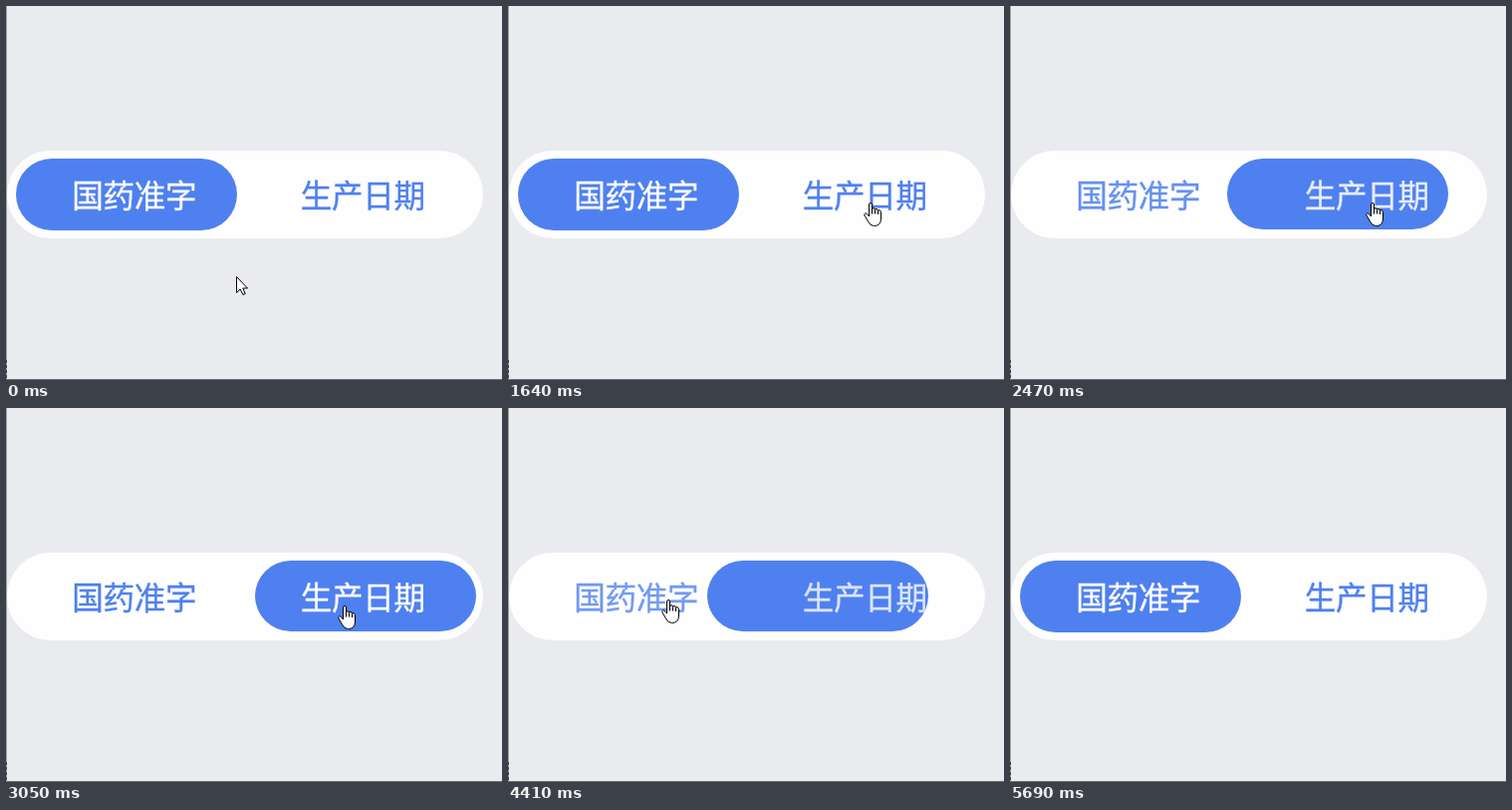
Write an HTML page that moves like this. It is 498x375 px and loops after 5990 ms.

```html
<!DOCTYPE html>
<html lang="zh-CN">
<head>
<meta charset="utf-8">
<style>
html, body { margin: 0; height: 100%; overflow: hidden; background: #eaebef; }
svg { display: block; }
text { font: 31.6px "Noto Sans CJK SC", "Noto Sans CJK", sans-serif; letter-spacing: -.4px; stroke-width: .35px; }
.cursor { fill: #fff; stroke: #000; stroke-linejoin: round; }
</style>
</head>
<body>
<svg width="498" height="375" viewBox="0 0 498 375">
  <rect x="1" y="145" width="478" height="88" rx="44" fill="#fefefe"/>
  <rect id="pill" y="153" width="222" rx="36" fill="#4f80ef"/>
  <text id="left" x="66.3" y="202.2">国药准字</text>
  <text id="right" x="295.8" y="202.2">生产日期</text>
  <path d="M.5 0V375" stroke="#a3a3a6"/>
  <path d="M0 374.5H498" stroke="#707072"/>
  <path d="M.5 355V375" stroke="#444" stroke-dasharray="3 2"/>
  <path id="arrow" class="cursor" d="M.5 .5V16.5L4.2 13L6.9 18.5L9.3 17.5L6.8 12H11.5Z"/>
  <path id="hand" class="cursor" d="M5.5 14V2Q5.5 .5 7 .5T8.5 2V7Q8.5 5.7 10 5.7T11.5 7.2Q11.7 6.5 13 6.5T14.5 8.2Q14.8 7.5 16 7.7T17.5 9.5V16Q17.5 23.5 10.5 23.5Q6.5 23.5 4.5 19L1 13Q.2 11.5 1.5 11T4 12.2ZM8.5 7V11.5M11.5 7.2V11.5M14.5 8.2V12"/>
</svg>
<script>
const LOOP = 5990, STEP = 120, SLIDE = 300;
const BLUE = [79, 128, 239], WHITE = [254, 254, 254];
const HOME = { x: 231, y: 271 };
const $ = id => document.getElementById(id);

// Cursor strokes: start time, number of steps, end point
const strokes = [
  { at: 710, n: 2, x: 228, y: 239 },
  { at: 980, n: 2, x: 314, y: 208 },
  { at: 1250, n: 2, x: 352, y: 202 },
  { at: 1520, n: 2, x: 357, y: 197 },
  { at: 3050, n: 1, x: 333, y: 198 },
  { at: 3200, n: 2, x: 215, y: 191 },
  { at: 3470, n: 1, x: 183, y: 191 },
  { at: 3620, n: 3, x: 154, y: 192 },
  { at: 5330, n: 4, x: 502, y: 416 }
];

const lerp = (a, b, k) => Math.round(a + (b - a) * k);
const mix = (a, b, k) => `rgb(${a.map((v, i) => lerp(v, b[i], k))})`;

function cursorAt(time) {
  let { x, y } = HOME;
  for (const s of strokes) {
    if (time < s.at) break;
    const k = Math.min(1, (Math.floor((time - s.at) / STEP) + 1) / s.n);
    x = lerp(x, s.x, k);
    y = lerp(y, s.y, k);
  }
  return { x, y };
}

// CSS "ease": cubic-bezier(.25, .1, .25, 1)
function ease(p) {
  const bezier = (u, a, b) => 3 * a * u * (1 - u) ** 2 + 3 * b * u * u * (1 - u) + u ** 3;
  let lo = 0, hi = 1;
  for (let i = 0; i < 20; i++) {
    const mid = (lo + hi) / 2;
    if (bezier(mid, .25, .25) < p) lo = mid; else hi = mid;
  }
  return bezier(lo, .1, 1);
}

// Slide progress, seen in steps; lead is how far it has run at the first one
function slide(time, at, lead) {
  if (time < at) return 0;
  const step = Math.floor((time - at) / STEP);
  return step > 1 ? 1 : ease((step * STEP + lead) / SLIDE);
}

function draw(time) {
  const k = slide(time, 2350, 53) - slide(time, 4410, 48);
  $("pill").setAttribute("x", lerp(10, 250, k));
  $("pill").setAttribute("height", k ? 71 : 72);
  $("left").style.fill = $("left").style.stroke = mix(WHITE, BLUE, k);
  $("right").style.fill = $("right").style.stroke = mix(BLUE, WHITE, k);

  const { x, y } = cursorAt(time);
  const overSwitch = y < 233;
  $("hand").style.display = overSwitch ? "" : "none";
  $("arrow").style.display = overSwitch ? "none" : "";
  $(overSwitch ? "hand" : "arrow").setAttribute("transform", `translate(${x} ${y})`);
}

const start = performance.now();
function frame() {
  draw((performance.now() - start) % LOOP);
  requestAnimationFrame(frame);
}
frame();
</script>
</body>
</html>
```
